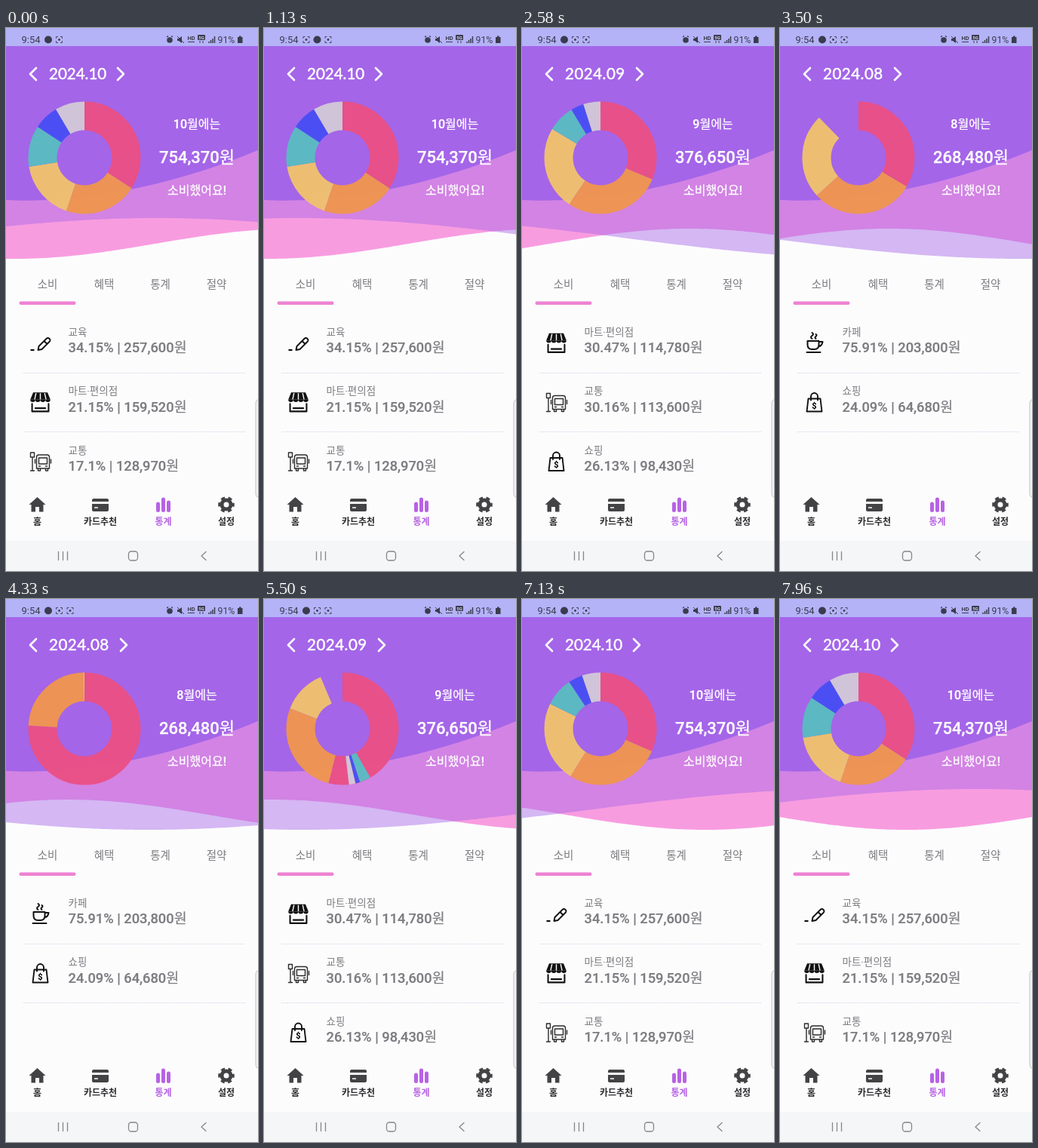
These frames come from a looping animation (334 by 720 pixels, 8000 ms). An HTML page:

```html
<!DOCTYPE html>
<html lang="ko">
<head>
<meta charset="utf-8">
<title>소비 통계</title>
<style>
html, body { margin: 0; width: 100%; height: 100%; overflow: hidden; background: #fcfcfd; }
svg { display: block; width: 100vw; height: 100vh; }
text { font-family: Roboto, 'Noto Sans CJK KR', 'Noto Sans CJK', 'Noto Sans KR', sans-serif; }
.mid { text-anchor: middle; }
.header { fill: #fff; font-weight: 500; stroke: #fff; stroke-width: .25; }
.title { font: 400 20.5px Lato, sans-serif; fill: #fff; stroke: #fff; stroke-width: .5; }
.soft { fill: #7c7c80; }
.value { font-size: 18.3px; font-weight: 500; stroke: #7c7c80; stroke-width: .2; }
.nav { font-size: 12px; font-weight: 700; }
.line { fill: none; stroke-linecap: round; stroke-linejoin: round; }
</style>
</head>
<body>
<svg viewBox="0 0 334 720" preserveAspectRatio="none">
  <defs>
    <g id="pen">
      <path d="M-13 9h5" stroke="#111" stroke-width="2.2"/>
      <path class="line" d="M-3 9L-2 4L8-6Q10-8 12-6T12-2L2 8ZM5-3L9 1" stroke="#111" stroke-width="1.900"/>
    </g>
    <g id="store" transform="scale(.95)">
      <path d="M-10-14H10L14-4H-14Z" fill="#111"/>
      <path d="M-6-13L-8-4M0-13V-4M6-13L8-4" stroke="#fcfcfd" stroke-width="1.500"/>
      <path d="M-14-4a3.500 3.500 0 0 0 7 0a3.500 3.500 0 0 0 7 0a3.500 3.500 0 0 0 7 0a3.500 3.500 0 0 0 7 0Z" fill="#111"/>
      <path class="line" d="M-11.500 2V12.500H11.500V2M-7 8H7" stroke="#111" stroke-width="2.200"/>
    </g>
    <g id="bus" class="line" stroke="#2c2c2c" stroke-width="1.400">
      <path d="M-13-12h5v6h-5ZM-10.500-6V12M-13 12h5M-5 9V-6Q-5-9-2-9H9Q12-9 12-6V9ZM-2-5H9V3H-2ZM-7-3V2M14-3V2M-3 9v3h3V9M7 9v3h3V9"/>
      <path d="M-2 6h2M7 6h2"/>
    </g>
    <g id="bag">
      <path class="line" d="M-8-5H8L10 12H-10ZM-4.500-3V-8a4.500 4.500 0 0 1 9 0V-3" stroke="#111" stroke-width="1.900"/>
      <text class="mid" y="8" font-size="11" font-weight="700">$</text>
    </g>
    <g id="cup" class="line" stroke="#111" stroke-width="2">
      <path d="M-9-3H6V2Q6 8 0 8H-3Q-9 8-9 2ZM6-2H11Q10 4 6 4M-10 12H8M-3-6q-3-2 0-4t0-4M2-6q-2-1.500 0-3t0-3"/>
    </g>
    <g id="scan" class="line" stroke="#44445c" stroke-width="1">
      <path d="M-4-2V-4H-2M2-4H4V-2M4 2V4H2M-2 4H-4V2"/>
    </g>
  </defs>

  <rect width="334" height="720" fill="#fcfcfd"/>
  <path id="pink" fill="#f89ce0"/>
  <path id="mauve" fill="#a465e8" fill-opacity=".46"/>
  <path d="M0 24H334V162C190 222 70 232 0 228Z" fill="#a465e8"/>
  <rect width="334" height="24" fill="#b4b3f8"/>

  <g fill="#3b3b4e">
    <text x="20.500" y="20" font-size="13">9:54</text>
    <g id="notices"></g>
    <circle cx="217" cy="16" r="3.800"/>
    <path d="M213 12l2-1.500M221 12l-2-1.500" stroke="#3b3b4e" stroke-width="1.300"/>
    <path d="M227 14h2l4-3v9l-4-3h-2Z"/>
    <path d="M227 11l9 9" stroke="#3b3b4e"/>
    <text class="mid" x="245.500" y="16" font-size="7.500" font-weight="700">HD</text>
    <path d="M241 18.500h9" stroke="#3b3b4e"/>
    <rect x="254" y="9" width="10" height="7" rx="1"/>
    <text class="mid" x="259" y="15" font-size="6" font-weight="700" fill="#d0cff8">5G</text>
    <path d="M257 17v3M261 17v3" stroke="#3b3b4e"/>
    <path d="M269 20v-2M271.500 20v-4M274 20v-6M276.500 20v-9" stroke="#3b3b4e" stroke-width="1.500"/>
    <text x="280.500" y="20" font-size="12.300">91%</text>
    <path d="M307 12h2v-1.500h2.500V12h2v8H307Z"/>
  </g>

  <g class="line" stroke="#fff" stroke-width="2.600">
    <path d="M40 53L32 61L40 69"/>
    <path id="next" d="M148 53L156 61L148 69"/>
  </g>
  <text class="title" id="month" x="57" y="68"></text>
  <g id="donut" transform="translate(104 172) rotate(-90)" fill="none" stroke-width="38" opacity=".96"></g>
  <g class="header mid">
    <text id="caption" x="253" y="133" font-size="16"></text>
    <text id="total" x="253" y="179" font-size="22"></text>
    <text x="253" y="221" font-size="16">소비했어요!</text>
  </g>

  <g class="soft mid" font-size="14.500" font-weight="500">
    <text x="55" y="345">소비</text><text x="130" y="345">혜택</text>
    <text x="204.500" y="345">통계</text><text x="279" y="345">절약</text>
  </g>
  <rect x="17.500" y="362.500" width="75" height="4.500" rx="2.200" fill="#ee82d2"/>
  <g id="list"></g>
  <path d="M23 457.500H317M23 535.500H317" stroke="#d9d9ec" stroke-dasharray="1.500 1"/>

  <g fill="#434345">
    <path d="M41.500 622L30.500 632H33.500V641.500H39V635H44V641.500H49.500V632H52.500Z"/>
    <path d="M116 624h18q2 0 2 2v2h-22v-2q0-2 2-2ZM114 631h22v8q0 2-2 2h-18q-2 0-2-2Z"/>
    <path d="M117 636h5" stroke="#fcfcfd" stroke-width="1.500"/>
    <circle cx="292" cy="632" r="6" fill="none" stroke="#434345" stroke-width="5"/>
    <circle cx="292" cy="632" r="9.300" fill="none" stroke="#434345" stroke-width="3" stroke-dasharray="5.200 4.540" stroke-dashoffset="2.600"/>
    <path d="M201.500 631v8.500M208.500 625v14.500M215.500 629v10.500" class="line" stroke="#b862e4" stroke-width="5"/>
    <g class="nav mid" fill="#2b2b2d">
      <text x="41.500" y="659">홈</text><text x="125" y="659">카드추천</text>
      <text x="208.500" y="659" fill="#b862e4">통계</text><text x="292" y="659">설정</text>
    </g>
  </g>

  <rect y="680" width="334" height="40" fill="#f5f6f7"/>
  <g class="line" stroke="#87878a" stroke-width="1.300">
    <path d="M69.500 694.500v11M75.500 694.500v11M81.500 694.500v11M265 694.500L259 700L265 705.500"/>
    <rect x="162.500" y="694" width="12" height="12" rx="3.500"/>
  </g>
  <path d="M336 492.500Q331 492.500 331 498V617Q331 622.500 336 622.500" fill="#f4f4f6" stroke="#c0c0c4"/>
</svg>

<script>
const LOOP = 8000, MORPH = 750, WIDTH = 334;
const $ = id => document.getElementById(id);
const COLORS = ['#ea5086', '#f09550', '#f0c26e', '#5abcc2', '#484ff4', '#d2c8d8'];

// ends: where each slice stops, in percent of the ring
const MONTHS = [
  { title: '2024.10', caption: '10월에는', total: '754,370원', shift: 0,
    ends: [34.15, 55.3, 72.4, 84.3, 91.5, 100],
    rows: [['pen', '교육', '34.15% | 257,600원'], ['store', '마트·편의점', '21.15% | 159,520원'], ['bus', '교통', '17.1% | 128,970원']] },
  { title: '2024.09', caption: '9월에는', total: '376,650원', shift: 4,
    ends: [30.47, 60.63, 86.76, 93.4, 96.1, 100],
    rows: [['store', '마트·편의점', '30.47% | 114,780원'], ['bus', '교통', '30.16% | 113,600원'], ['bag', '쇼핑', '26.13% | 98,430원']] },
  { title: '2024.08', caption: '8월에는', total: '268,480원', shift: 4,
    ends: [75.91, 99.7, 100],
    rows: [['cup', '카페', '75.91% | 203,800원'], ['bag', '쇼핑', '24.09% | 64,680원']] }
];
const VISITS = [[0, 0], [2000, 1], [3450, 2], [5140, 1], [6900, 0]];

// wave phases in degrees over time
const TIMES = [0, 1130, 2580, 4330, 5500, 6170, 7960];
const PINK_PHASE = [-6, -3, 72, 140, 174, 200, 279];
const MAUVE_PHASE = [126, 168, 232, 309, 346, 374, 470];

$('donut').innerHTML = COLORS.map(c => `<circle r="55.5" pathLength="100" stroke="${c}"/>`).join('');
const slices = [...$('donut').children];

const mix = (a, b, p) => a + (b - a) * p;

function spline(values, t) {
  const last = TIMES.length - 1;
  let i = 0;
  while (i < last - 1 && t > TIMES[i + 1]) i++;
  const slope = k => {
    const a = Math.max(k - 1, 0), b = Math.min(k + 1, last);
    return (values[b] - values[a]) / (TIMES[b] - TIMES[a]);
  };
  const span = TIMES[i + 1] - TIMES[i], u = (t - TIMES[i]) / span, v = 1 - u;
  return values[i] * (1 + 2 * u) * v * v + values[i + 1] * (3 - 2 * u) * u * u
    + span * u * v * (slope(i) * v - slope(i + 1) * u);
}

function wave(id, middle, height, phase, sweep) {
  let d = 'M0 24';
  for (let x = 0; x <= WIDTH + 4; x += 4) {
    const angle = (phase + sweep * x / WIDTH) * Math.PI / 180;
    d += `L${x} ${(middle + height * Math.cos(angle)).toFixed(2)}`;
  }
  $(id).setAttribute('d', d + 'V24Z');
}

function sliceAt(month, i) {
  const { ends } = month;
  return i < ends.length ? [i ? ends[i - 1] : 0, ends[i]] : [0, 0];
}

function drawDonut(from, to, p) {
  slices.forEach((slice, i) => {
    const [a, b] = sliceAt(from, i), [c, d] = sliceAt(to, i);
    const start = mix(a, c, p), size = mix(b, d, p) - start;
    slice.style.display = i < to.ends.length ? '' : 'none';
    slice.setAttribute('stroke-dasharray', `${size} 200`);
    slice.setAttribute('stroke-dashoffset', -start);
  });
}

let shown, noticeState;

function showMonth(month) {
  if (shown === month) return;
  shown = month;
  for (const [id, key] of [['month', 'title'], ['caption', 'caption'], ['total', 'total']]) $(id).textContent = month[key];
  $('month').style.letterSpacing = month.shift ? '.5px' : '0';
  $('next').setAttribute('transform', `translate(${month.shift})`);
  $('list').innerHTML = month.rows.map(([icon, name, value], i) => `
    <g transform="translate(0 ${i * 78.5})">
      <use href="#${icon}" x="45.5" y="418"/>
      <text class="soft" x="82.5" y="407.5" font-size="13.5">${name}</text>
      <text class="soft value" x="82.5" y="430">${value}</text>
    </g>`).join('');
}

function showNotices(t) {
  const state = t < 700 ? 0 : t < 1700 ? 1 : 2;
  if (state === noticeState) return;
  noticeState = state;
  const order = [['chat', 'scan'], ['scan', 'chat', 'scan'], ['chat', 'scan', 'scan']][state];
  $('notices').innerHTML = order.map((kind, i) => {
    const x = 56 + i * 14.5;
    return kind === 'chat'
      ? `<circle cx="${x}" cy="15.5" r="5"/>`
      : `<use href="#scan" x="${x}" y="15.5"/><circle cx="${x}" cy="15.5" r="1.4"/>`;
  }).join('');
}

function draw(t) {
  let v = VISITS.length - 1;
  while (VISITS[v][0] > t) v--;
  const to = MONTHS[VISITS[v][1]], from = v ? MONTHS[VISITS[v - 1][1]] : to;
  showMonth(to);
  showNotices(t);
  drawDonut(from, to, Math.min((t - VISITS[v][0]) / MORPH, 1));
  wave('pink', 286, 20, spline(PINK_PHASE, t), 162);
  wave('mauve', 279, 27, spline(MAUVE_PHASE, t), 90);
}

const began = performance.now();
function tick() {
  draw((performance.now() - began) % LOOP);
  requestAnimationFrame(tick);
}
tick();
</script>
</body>
</html>
```
